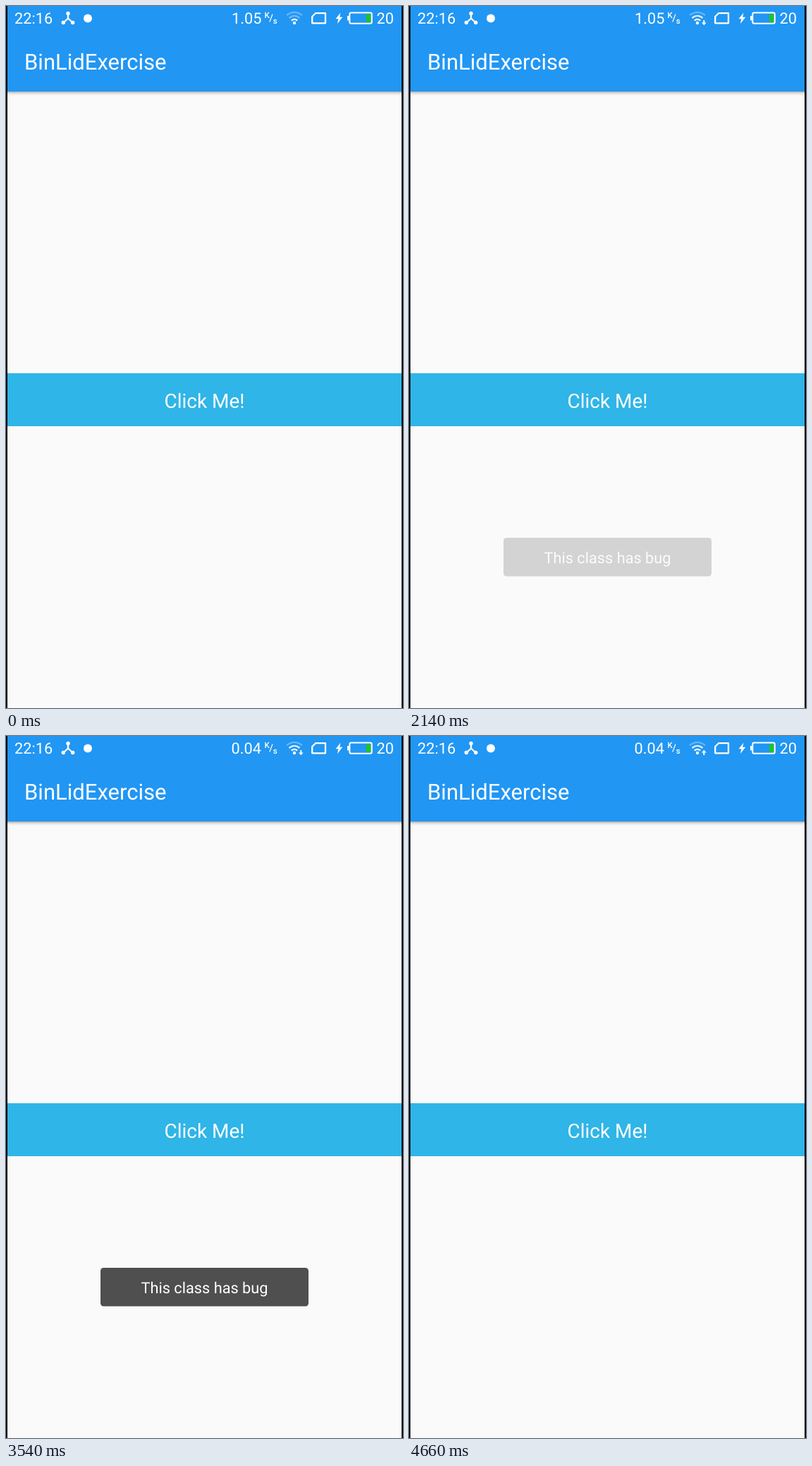
These frames come from a looping animation (563x994 px, 4.75 s). An HTML page:

```html
<!DOCTYPE html>
<html lang="en">
<head>
<meta charset="utf-8">
<title>Toast demo</title>
<style>
  html, body { margin: 0; width: 100%; height: 100%; overflow: hidden; background: #fafafa; }
  svg { display: block; width: 563px; height: 994px; }
  text { font-family: Roboto, sans-serif; font-size: 21.74px; fill: #fff; text-rendering: geometricPrecision; }
  .title { font-size: 31.06px; }
  .button { font-size: 27.95px; }
  .unit { font-size: 11.5px; font-weight: 500; }
  .mid { text-anchor: middle; }
  .line { fill: none; stroke: #fff; stroke-width: 2.3; }

  .toast, .speed, .arrow, .signal { animation: 4750ms step-end infinite; }
  .toast { animation-name: toast; }
  .speed, .arrow { opacity: 0; }
  .first { animation-name: first; }
  .second { animation-name: second; }
  .third { animation-name: third; }
  .down { animation-name: down; }
  .up { animation-name: up; }
  .signal { animation-name: signal; }

  /* Percentages are the event time divided by 4750 ms. */
  @keyframes toast {
    0% { opacity: 0; }
    43.158% { opacity: .01; }
    45.053% { opacity: .23; }
    47.158% { opacity: .67; }
    49.053% { opacity: .96; }
    50.947% { opacity: 1; }
    82.526% { opacity: .965; }
    84.421% { opacity: .79; }
    86.316% { opacity: .53; }
    88.421% { opacity: .24; }
    90.316% { opacity: .05; }
    92.211%, 100% { opacity: 0; }
  }
  @keyframes first { 0% { opacity: 1; } 58.947%, 100% { opacity: 0; } }
  @keyframes second { 0% { opacity: 0; } 58.947% { opacity: 1; } 74.526%, 100% { opacity: 0; } }
  @keyframes third { 0% { opacity: 0; } 74.526%, 100% { opacity: 1; } }
  @keyframes down {
    0% { opacity: 0; }
    31.368% { opacity: 1; }
    53.053% { opacity: 0; }
    74.526% { opacity: 1; }
    96.211%, 100% { opacity: 0; }
  }
  @keyframes up { 0% { opacity: 0; } 98.105%, 100% { opacity: 1; } }
  @keyframes signal {
    0% { opacity: .35; }
    31.368% { opacity: .85; }
    58.947% { opacity: .35; }
    74.526%, 100% { opacity: .85; }
  }
</style>
</head>
<body>
<svg viewBox="0 0 563 994">
  <defs>
    <linearGradient id="shadow" x2="0" y2="1">
      <stop offset="0" stop-opacity=".32"/>
      <stop offset=".45" stop-opacity=".1"/>
      <stop offset="1" stop-opacity="0"/>
    </linearGradient>
  </defs>

  <rect width="563" height="994" fill="#fafafa"/>
  <rect y="121" width="563" height="6" fill="url(#shadow)"/>
  <rect width="563" height="121" fill="#2196f3"/>
  <rect y="520" width="563" height="75" fill="#2fb5e7"/>

  <!-- Status bar, left -->
  <text x="12" y="25">22:16</text>
  <g fill="#fff">
    <path class="line" d="M88 10V17.5L81.5 23.5M88 17.5L94.5 23.5"/>
    <circle cx="88" cy="10.5" r="2.7"/>
    <circle cx="81.3" cy="23.5" r="2.7"/>
    <circle cx="94.7" cy="23.5" r="2.7"/>
    <circle cx="116" cy="17.5" r="6"/>
  </g>

  <!-- Network speed -->
  <text class="speed first" x="320" y="25">1.05</text>
  <text class="speed second" x="319.5" y="25">2.31</text>
  <text class="speed third" x="319.5" y="25">0.04</text>
  <text class="unit" x="366.5" y="17">K</text>
  <path d="M373.8 22.5L378 11.5" stroke="#fff" stroke-width="1.2"/>
  <text class="unit" x="378.8" y="25">s</text>

  <!-- Wireless signal -->
  <g class="line">
    <path d="M398 13.2Q409 4.5 420 13.2" opacity=".32"/>
    <path class="signal" d="M401.5 17Q409 10.8 416.5 17"/>
    <path d="M404.8 20.6Q409 17.2 413.2 20.6"/>
  </g>
  <circle cx="409" cy="24" r="2.2" fill="#fff"/>
  <path class="arrow down" d="M417.3 20h2v3.5h2.4L418.3 27.3 414.9 23.5h2.4z" fill="#fff"/>
  <path class="arrow up" d="M417.3 27h2v-3.5h2.4L418.3 19.8 414.9 23.5h2.4z" fill="#fff"/>

  <!-- Card, charge and battery -->
  <path class="line" d="M439 10.2H453V24.3H434.2V15z" stroke-linejoin="round"/>
  <path d="M474.5 9.5L467.5 18.3H471.4L469.8 25.3 477.3 15.8H473.2z" fill="#fff"/>
  <rect class="line" x="487.3" y="9.6" width="31.4" height="15.2" rx="2" style="stroke-width:2"/>
  <rect x="484" y="14" width="2.6" height="6.4" fill="#fff"/>
  <rect x="511" y="11.5" width="6" height="11.5" fill="#20c520"/>
  <text x="525.6" y="25">20</text>

  <text class="title" x="26" y="90">BinLidExercise</text>
  <text class="button mid" x="281.5" y="568.5">Click Me!</text>

  <g class="toast">
    <rect x="134" y="753" width="295" height="54.5" rx="4.5" fill="#4f4f4f"/>
    <text class="mid" x="281.5" y="789.3">This class has bug</text>
  </g>

  <path d="M0 0h2v994H0zM561 0h2v994h-2z"/>
</svg>
</body>
</html>
```
